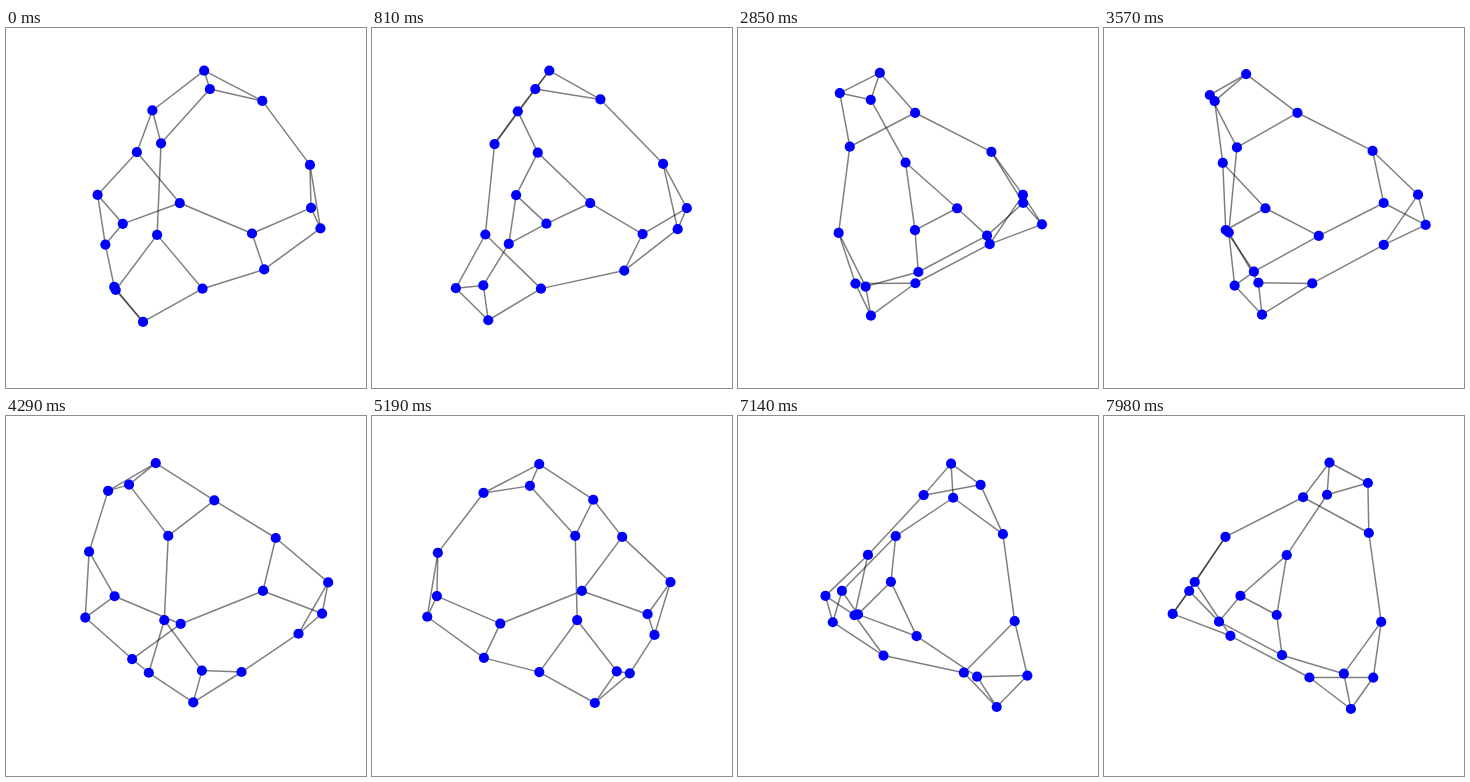
Recreate the animation shown at these times as an HTML page with a canvas. Size 360 px wide and 360 px high, loop 8 s.

```html
<!DOCTYPE html>
<html lang="en">
<head>
<meta charset="utf-8">
<title>Rotating cubic graph</title>
<style>
  html, body { margin: 0; width: 100%; height: 100%; overflow: hidden; background: #fff; }
  canvas { display: block; }
</style>
</head>
<body>
<canvas id="stage" width="360" height="360"></canvas>
<script>
const ctx = document.getElementById('stage').getContext('2d');
const LOOP = 8000, STEP = 30;            // one degree every 30 ms
const CENTER_X = 184.9, CENTER_Y = 176, PERSPECTIVE = 0.0005;

// Depth, sideways offset and height of each vertex at angle 0
const vertices = {
  A: [41.9, 13, -130.5],    B: [81.4, 18.2, -110.3],  C: [44.5, 69.8, -100.8],
  D: [11.3, -38.3, -93],    E: [77.2, -28.7, -58.3],  F: [-65.6, -55.8, -53.5],
  G: [6, 118.7, -39],       H: [-96.3, -97.8, -9.5],  I: [-99.8, -11.7, -1],
  J: [-42.9, 122.7, 4],     K: [-116.9, -72.1, 21],   L: [-3.9, 129.8, 24.5],
  M: [-67.7, 63.2, 30.5],   N: [89.1, -32.3, 29.5],   O: [-62.1, -88.2, 41.8],
  P: [-2, 73.4, 65.5],      Q: [76.7, -72.3, 82.7],   R: [14.5, -76.1, 82.3],
  S: [56.3, 11.3, 82.3],    T: [57.6, -46.5, 114.5]
};
const edges = ('AB AC AD BC BE CG DE DF EN FH FI GJ GL HK HO ' +
               'IK IM JL JM KO LP MP NQ NS OR PS QR QT RT ST').split(' ');

function project([depth, side, height], angle) {
  const cos = Math.cos(angle), sin = Math.sin(angle);
  const scale = 1 / (1 - PERSPECTIVE * (depth * cos + side * sin));
  return [CENTER_X + scale * (side * cos - depth * sin), CENTER_Y + scale * height];
}

function draw(time) {
  const angle = Math.floor((time % LOOP) / STEP) * Math.PI / 180;
  const points = {};
  for (const name in vertices) points[name] = project(vertices[name], angle);

  ctx.fillStyle = '#fff';
  ctx.fillRect(0, 0, 360, 360);

  // Stroked one by one so that overlapping edges darken
  ctx.strokeStyle = 'rgba(0, 0, 0, 0.5)';
  ctx.lineWidth = 1.5;
  for (const [from, to] of edges) {
    ctx.beginPath();
    ctx.moveTo(...points[from]);
    ctx.lineTo(...points[to]);
    ctx.stroke();
  }

  ctx.fillStyle = '#00f';
  for (const [x, y] of Object.values(points)) {
    ctx.beginPath();
    ctx.arc(x, y, 5.1, 0, 2 * Math.PI);
    ctx.fill();
  }
}

function tick(now) {
  draw(now);
  requestAnimationFrame(tick);
}
draw(0);
requestAnimationFrame(tick);
</script>
</body>
</html>
```
